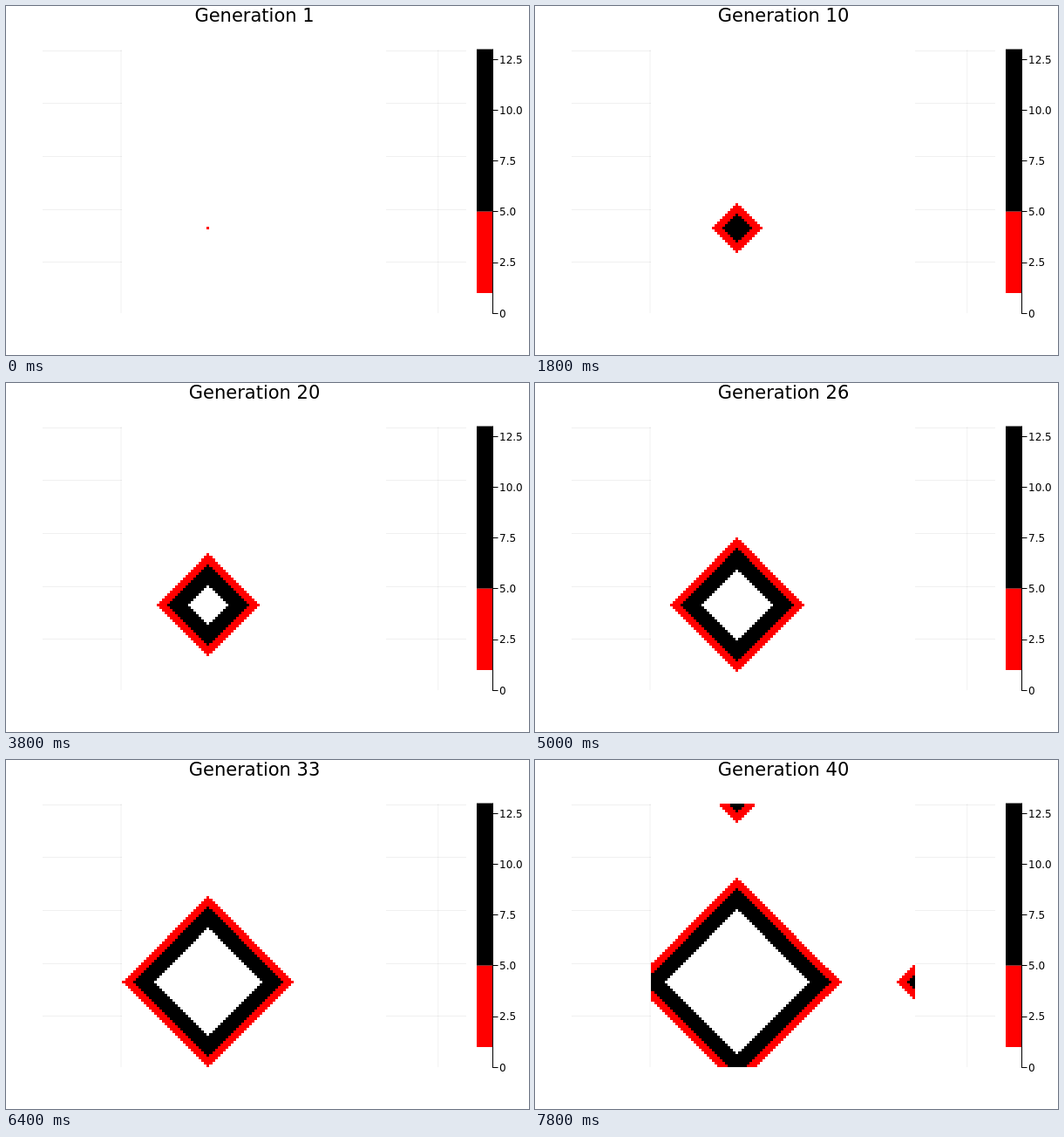
Recreate the animation shown at these times as an HTML page with a canvas. Size 600 by 400 pixels, loop 8000 ms.

```html
<!DOCTYPE html>
<html lang="en">
<head>
<meta charset="utf-8">
<title>Generations</title>
<style>
  html, body { margin: 0; width: 100%; height: 100%; overflow: hidden; background: #fff; }
  svg, canvas { position: absolute; display: block; }
  svg { left: 0; top: 0; }
  canvas { left: 133px; top: 50px; }
  text { font-family: "DejaVu Sans", sans-serif; font-kerning: none; }
  #title { font-size: 21px; text-anchor: middle; }
  #scale text { font-size: 12px; }
  #scale path { stroke: #000; fill: none; }
  #grid { stroke: #000; stroke-opacity: .06; }
</style>
</head>
<body>
<svg width="600" height="400" viewBox="0 0 600 400">
  <path id="grid" fill="none"/>
  <text id="title" x="285" y="18">Generation 1</text>
  <rect x="540" y="49.5" width="18.5" height="186.2" fill="#000"/>
  <rect x="540" y="235.7" width="18.5" height="93.3" fill="#f00"/>
  <g id="scale"></g>
</svg>
<canvas width="303" height="302"></canvas>
<script>
const STEP = 200, GENERATIONS = 40;
const SIZE = 100, SEED_COL = 32, SEED_ROW = 67;
const RED_AGES = 4, ACTIVE_AGES = 12;

const canvas = document.querySelector('canvas');
const ctx = canvas.getContext('2d');
const title = document.getElementById('title');

function drawFrame() {
  const rows = [0, 1, 2, 3, 4].map(i => `M42 ${[51.5, 111.5, 172.5, 233.5, 293.5][i]}H528`);
  const cols = [132, 495.8].map(x => `M${x} 50V352`);
  document.getElementById('grid').setAttribute('d', rows.concat(cols).join(''));

  let axis = 'M558.5 49.5V353', labels = '';
  for (let i = 0; i <= 5; i++) {
    const y = 352.3 - i * 58.2;
    axis += `M558.5 ${Math.floor(y) + .5}H564.5`;
    labels += `<text x="566" y="${Math.round(y + 4.2)}">${i ? (i * 2.5).toFixed(1) : 0}</text>`;
  }
  document.getElementById('scale').innerHTML = `<path d="${axis}"/>${labels}`;
}

const wrap = n => (n + SIZE) % SIZE;
const edge = (n, length) => Math.ceil(n * length / SIZE);

function fillCell(col, row) {
  const x = edge(col, canvas.width), y = edge(row, canvas.height);
  ctx.fillRect(x, y, edge(col + 1, canvas.width) - x, edge(row + 1, canvas.height) - y);
}

// The wave spreads one cell per generation on a wrapping board.
function drawGeneration(generation) {
  const radius = generation - 1;
  title.textContent = `Generation ${generation}`;
  ctx.fillStyle = '#fff';
  ctx.fillRect(0, 0, canvas.width, canvas.height);
  for (let dy = -radius; dy <= radius; dy++) {
    for (let dx = -radius; dx <= radius; dx++) {
      const age = radius - Math.abs(dx) - Math.abs(dy);
      if (age < 0 || age >= ACTIVE_AGES) continue;
      ctx.fillStyle = age < RED_AGES ? '#f00' : '#000';
      fillCell(wrap(SEED_COL + dx), wrap(SEED_ROW + dy));
    }
  }
}

const start = performance.now();
let shown = 0;
function tick() {
  const generation = Math.floor((performance.now() - start) / STEP) % GENERATIONS + 1;
  if (generation !== shown) drawGeneration(shown = generation);
  requestAnimationFrame(tick);
}

drawFrame();
tick();
</script>
</body>
</html>
```
